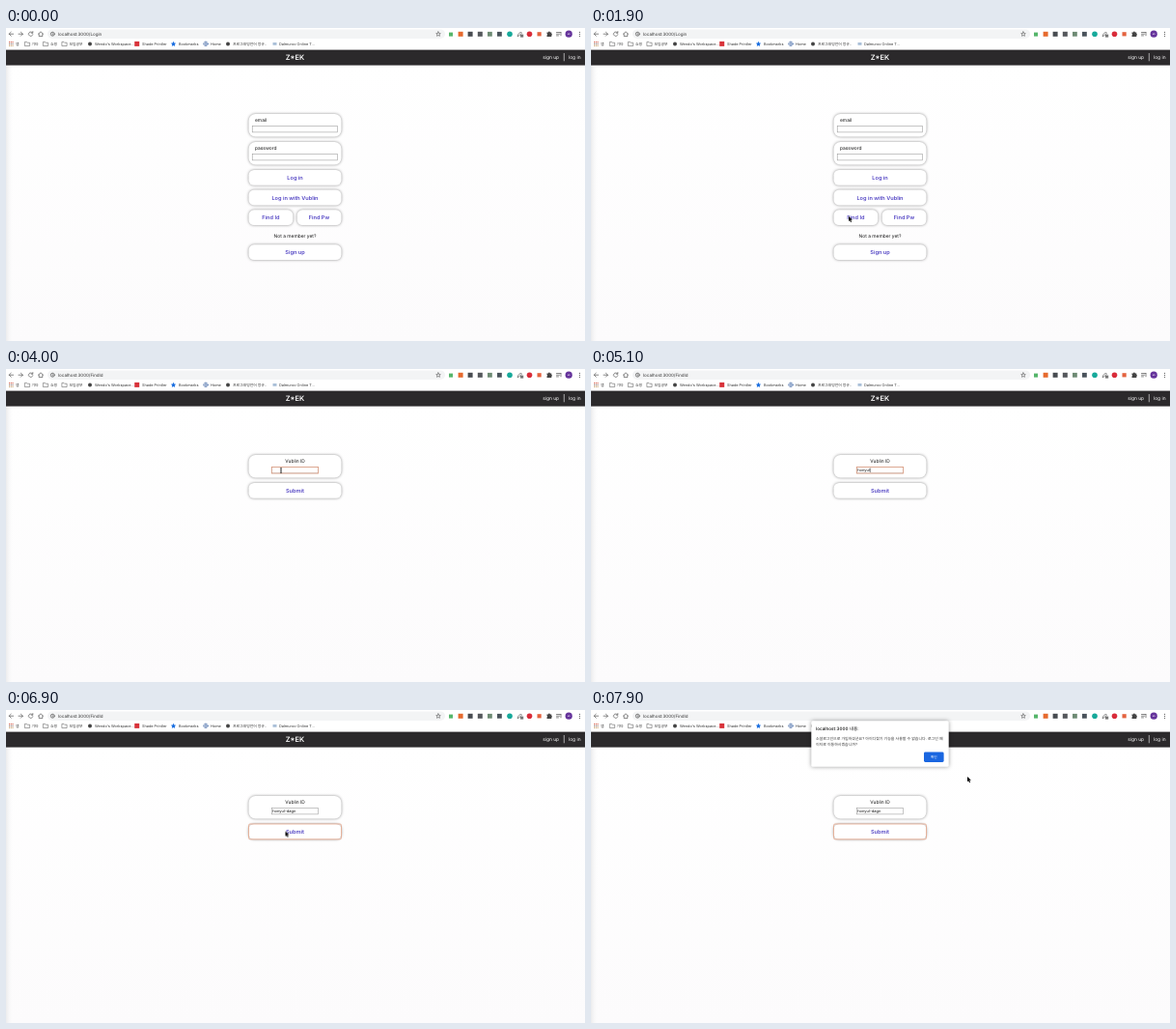
An HTML page that plays this animation: 600x324 px, repeating every 8 s.

```html
<!DOCTYPE html>
<html lang="en">
<head>
<meta charset="utf-8">
<title>Find id flow</title>
<style>
  html, body { margin: 0; width: 100%; height: 100%; overflow: hidden; background: #fff; }
  svg { position: absolute; left: 0; top: 0; width: 600px; height: 324px; }
  text {
    font: 4.9px Inter, "Noto Sans CJK KR", "Noto Sans CJK", sans-serif;
    fill: #111; text-rendering: geometricPrecision;
  }
  .mid { text-anchor: middle; }
  .url { font-size: 4.5px; fill: #333; }
  .marks text { font-size: 3.85px; fill: #333; }
  .nav text { fill: #fff; }
  .nav .brand { font-size: 7.4px; font-weight: 600; }
  .link { font-size: 5.6px; font-weight: 600; fill: #5345c4; text-anchor: middle; }
  .card { fill: #fff; filter: drop-shadow(0 0 1.6px rgba(0, 0, 0, .45)); }
  .field { fill: #fff; stroke: #8c8c8c; stroke-width: .5; }
  .ring { fill: none; stroke: #e59c7c; stroke-width: .7; }
  .line { fill: none; stroke: #555; stroke-width: .7; stroke-linecap: round; stroke-linejoin: round; }
  .typed { font-size: 4.05px; }
  .title { font-size: 4.65px; font-weight: 500; }
  .body { font-size: 3.95px; fill: #333; }
  .ok { font-size: 3.7px; font-weight: 500; fill: #fff; text-anchor: middle; }

  #login, #login-url, #find, #find-url, #focus, #pressed, #arrow, #beam, #dialog {
    animation: 8s step-end infinite;
  }
  #login, #login-url { animation-name: before; }
  #find, #find-url { animation-name: after; }
  #focus { animation-name: focus; }
  #pressed { animation-name: pressed; }
  #arrow { animation-name: arrow; }
  #beam { animation-name: beam; }
  #dialog { animation-name: dialog; transform-origin: 299.5px 35px; }
  #pointer { animation: travel 8s linear infinite; }

  @keyframes before { 0% { opacity: 1 } 30%, 100% { opacity: 0 } }
  @keyframes after { 0% { opacity: 0 } 30%, 100% { opacity: 1 } }
  @keyframes focus { 0% { opacity: 0 } 42.5% { opacity: 1 } 86.25%, 100% { opacity: 0 } }
  @keyframes pressed { 0% { opacity: 0 } 86.25%, 100% { opacity: 1 } }
  @keyframes arrow {
    0% { opacity: 0 } 2.5% { opacity: 1 } 40% { opacity: 0 } 83.75%, 100% { opacity: 1 }
  }
  @keyframes beam {
    0% { opacity: 0 } 40% { opacity: 1 } 52.5% { opacity: 0 }
    82.5% { opacity: 1 } 83.75%, 100% { opacity: 0 }
  }
  /* The screen refreshes every 100 ms, so each leg is cut into that many steps. */
  @keyframes travel {
    0% { transform: translate(569px, 153px) }
    5% { transform: translate(569px, 153px); animation-timing-function: steps(3, start) }
    8.75% { transform: translate(330px, 226px); animation-timing-function: steps(3, start) }
    12.5% { transform: translate(267px, 208px) }
    13.75% { transform: translate(267px, 208px); animation-timing-function: steps(4, start) }
    18.75% { transform: translate(267px, 194.5px) }
    35% { transform: translate(267px, 195.5px); animation-timing-function: steps(5, start) }
    41.25% { transform: translate(285px, 105px) }
    82.5% { transform: translate(285px, 105px); animation-timing-function: steps(3, start) }
    86.25% { transform: translate(289.5px, 125.5px) }
    95% { transform: translate(289.5px, 125.5px); animation-timing-function: steps(2, start) }
    97.5%, 100% { transform: translate(390px, 69px) }
  }
  @keyframes dialog {
    0% { opacity: 0 }
    87.5% { opacity: .1; transform: translateY(-7px) perspective(300px) rotateX(16deg) scale(.95) }
    88.75% { opacity: .36; transform: translateY(-4px) perspective(300px) rotateX(10deg) scale(.97) }
    90% { opacity: .8; transform: translateY(-1px) perspective(300px) rotateX(3deg) scale(.99) }
    91.25%, 100% { opacity: 1; transform: none }
  }
</style>
</head>
<body>
<svg viewBox="0 0 600 324">
  <defs>
    <linearGradient id="paper" x2="0" y2="1">
      <stop stop-color="#fff"/><stop offset="1" stop-color="#fcfbfc"/>
    </linearGradient>
    <linearGradient id="edge">
      <stop stop-color="#ececed"/><stop offset="1" stop-color="#fff" stop-opacity="0"/>
    </linearGradient>
    <path id="folder" d="M-2.6-2h2l.7.8h2.5v3.4h-5.2z" fill="none" stroke="#666" stroke-width=".6"/>
    <path id="star" d="M0-2.7.8-.9 2.7-.7 1.3.6 1.7 2.5 0 1.5-1.7 2.5-1.3.6-2.7-.7-.8-.9z"/>
  </defs>
  <rect y="38" width="600" height="286" fill="url(#paper)"/>
  <rect y="38" width="8" height="286" fill="url(#edge)"/>

  <!-- browser bars -->
  <rect width="600" height="23" fill="#fff"/>
  <rect x="43" y="1.4" width="412" height="9.6" rx="4.8" fill="#f3f4f5"/>
  <g class="line">
    <path d="M7.6 6.2h-4.4m2-2-2 2 2 2M13 6.2h4.4m-2-2 2 2-2 2"/>
    <path d="M27.4 4.8a2.2 2.2 0 1 0 .4 2M27.8 3.6v1.6h-1.6"/>
    <path d="M33.4 6.2 36 3.8l2.6 2.4M34.2 6v2.6h3.6V6"/>
    <circle cx="48.3" cy="6.2" r="2"/><path d="M48.3 6v1.2M48.3 5v.1"/>
    <use href="#star" transform="translate(448 6.2) scale(.85)"/>
  </g>
  <text id="login-url" class="url" x="54" y="7.8">localhost:3000/Login</text>
  <text id="find-url" class="url" x="54" y="7.8">localhost:3000/FindId</text>
  <rect x="459" y="4.6" width="4" height="4" fill="#55b56a"/>
  <rect x="468.6" y="3.8" width="5" height="5" fill="#e66a2e"/>
  <rect x="478.6" y="3.8" width="5" height="5" fill="#484b50"/>
  <rect x="488.8" y="3.8" width="5" height="5" fill="#55585c"/>
  <rect x="499" y="3.9" width="4.8" height="4.8" fill="#6e8b74"/>
  <rect x="509" y="3.9" width="4.8" height="4.8" fill="#4a535b"/>
  <circle cx="522" cy="6.3" r="2.8" fill="#16a99a"/>
  <path class="line" d="m530.2 8.4.4-1.6 2.8-2.8 1.1 1.1-2.8 2.8z"/>
  <rect x="533" y="6.6" width="3.2" height="3" fill="#777"/>
  <circle cx="542.5" cy="6.3" r="2.8" fill="#d92c3a"/>
  <rect x="550.5" y="4.2" width="4.2" height="4.2" fill="#e4633f"/>
  <path d="M560.5 4.5h1.5a.9.9 0 0 1 1.8 0h1.5V6a.9.9 0 0 1 0 1.7v1.2h-4.8V7.5a.8.8 0 0 0 0-1.5z" fill="#444"/>
  <path class="line" d="M570.5 4.5h4.4M570.5 6.2h3M570.5 7.9h2M575 7.8V4.6"/>
  <circle cx="583.2" cy="6.2" r="3.6" fill="#65339b"/>
  <text class="mid" x="583.2" y="7.1" style="font-size:2.5px;fill:#fff">ab</text>
  <g fill="#555"><circle cx="594.5" cy="4.3" r=".6"/><circle cx="594.5" cy="6.3" r=".6"/><circle cx="594.5" cy="8.3" r=".6"/></g>

  <g class="marks">
    <g stroke-width="1.1" stroke-dasharray="1.1 .65">
      <path d="M3 14.5h4.6" stroke="#d9604f"/><path d="M3 16.4h4.6" stroke="#a0807a"/><path d="M3 18.3h4.6" stroke="#b98a4c"/>
    </g>
    <text x="10" y="17.8">앱</text>
    <use href="#folder" x="22" y="16.4"/><text x="26.5" y="17.8">기타</text>
    <use href="#folder" x="41" y="16.4"/><text x="46" y="17.8">쇼핑</text>
    <use href="#folder" x="60.5" y="16.4"/><text x="65.5" y="17.8">모임공부</text>
    <circle cx="87" cy="16.4" r="2" fill="#444"/><text x="92" y="17.8">Wendo's Workspace...</text>
    <rect x="133.2" y="13.9" width="5" height="5" fill="#d8333a"/><text x="141" y="17.8">Shade Printler</text>
    <use href="#star" x="173.5" y="16.4" fill="#1b6fe0"/><text x="179" y="17.8">Bookmarks</text>
    <g class="line" style="stroke:#4a6fa8;stroke-width:.5"><circle cx="207" cy="16.4" r="2.3"/><path d="M204.7 16.4h4.6M207 14.1q-2 2.3 0 4.6 2-2.3 0-4.6"/></g>
    <text x="212" y="17.8">Home</text>
    <circle cx="230" cy="16.4" r="2" fill="#444"/><text x="235" y="17.8">프로그래밍언어 정규..</text>
    <rect x="276.5" y="15" width="4" height="2.8" fill="#a9bfd8"/><text x="283" y="17.8">Dalmuroo Online T...</text>
  </g>

  <g class="nav">
    <rect y="22.6" width="600" height="16" fill="#2b292b"/>
    <text class="brand mid" x="299.5" y="32.8">Z*EK</text>
    <text x="556.2" y="31.6">sign up</text>
    <path d="M578.3 26v8.3" stroke="#ddd" stroke-width=".7"/>
    <text x="583" y="31.6">log in</text>
  </g>

  <g id="login">
    <rect class="card" x="251.5" y="89" width="96" height="23.5" rx="7"/>
    <text x="258" y="96.5">email</text>
    <rect class="field" x="255.2" y="101.6" width="88.3" height="6.3"/>
    <rect class="card" x="251.5" y="118" width="96" height="23.5" rx="7"/>
    <text x="258" y="125.5">password</text>
    <rect class="field" x="255.2" y="130.6" width="88.3" height="6.3"/>
    <rect class="card" x="251.5" y="147" width="96" height="15.8" rx="5.5"/>
    <text class="link" x="299.5" y="156.8">Log in</text>
    <rect class="card" x="251.5" y="167.6" width="96" height="15.8" rx="5.5"/>
    <text class="link" x="299.5" y="177.5">Log in with Vublin</text>
    <rect class="card" x="251.5" y="188.3" width="45.8" height="15.8" rx="5.5"/>
    <text class="link" x="274.4" y="198.2">Find Id</text>
    <rect class="card" x="301.7" y="188.3" width="45.8" height="15.8" rx="5.5"/>
    <text class="link" x="324.5" y="198.2">Find Pw</text>
    <text class="mid" x="299.5" y="216.7">Not a member yet?</text>
    <rect class="card" x="251.5" y="224.3" width="96" height="15.8" rx="5.5"/>
    <text class="link" x="299.5" y="234.2">Sign up</text>
  </g>

  <g id="find">
    <rect class="card" x="251.5" y="89" width="96" height="23.5" rx="7"/>
    <text class="mid" x="299.5" y="96.5">Vublin ID</text>
    <rect class="field" x="275.3" y="101.6" width="48.3" height="6.3"/>
    <rect id="focus" class="ring" x="275.2" y="101.5" width="48.5" height="6.5"/>
    <text id="typed" class="typed" x="276.2" y="106.2"></text>
    <path id="caret" d="M0 102.6v4.4" stroke="#111" stroke-width=".5"/>
    <rect class="card" x="251.5" y="118" width="96" height="15.8" rx="5.5"/>
    <rect id="pressed" class="ring" x="251.5" y="118" width="96" height="15.8" rx="1.5"/>
    <text class="link" x="299.5" y="127.8">Submit</text>
  </g>
</svg>

<svg id="dialog" viewBox="0 0 600 324">
  <rect x="228.3" y="11.2" width="142.4" height="47.6" rx="1.6" fill="#fff" style="filter:drop-shadow(0 .8px 2px rgba(0,0,0,.4))"/>
  <text class="title" x="233" y="21">localhost:3000 내용:</text>
  <text class="body" x="233" y="30.6">소셜로그인으로 가입하셨군요? 아이디찾기 기능을 사용할 수 없습니다. 로그인 페</text>
  <text class="body" x="233" y="37">이지로 이동하시겠습니까?</text>
  <rect x="345" y="43.6" width="20.6" height="10.4" rx="1.4" fill="#1a66e0"/>
  <text class="ok" x="355.3" y="50.2">확인</text>
</svg>

<svg viewBox="0 0 600 324">
  <g id="pointer">
    <path id="arrow" d="M0 0v5.3l1.2-1.1.9 2 1-.4-.9-2h1.7z" stroke="#fff" stroke-width=".5" paint-order="stroke"/>
    <path id="beam" d="M-.9-2.6Q0-2.6 0-1.9V2Q0 2.7-.9 2.7M.9-2.6Q0-2.6 0-1.9V2Q0 2.7.9 2.7" fill="none" stroke="#222" stroke-width=".6"/>
  </g>
</svg>

<script>
  const LOOP = 8000;
  const word = "honyul-dagn";
  const keyTimes = [4200, 4300, 4500, 4700, 4900, 5100, 5400, 5700, 5800, 6000, 6200];
  const typed = document.getElementById("typed");
  const caret = document.getElementById("caret");
  const start = performance.now();

  function draw() {
    const t = (performance.now() - start) % LOOP;
    const text = word.slice(0, keyTimes.filter(k => k <= t).length);
    if (typed.textContent !== text) typed.textContent = text;

    const shown = t >= 3500 && t < 6900 && !(t >= 4000 && t < 4200);
    const x = 276.5 + (text ? typed.getComputedTextLength() : 0);
    caret.setAttribute("transform", `translate(${x} 0)`);
    caret.style.opacity = shown ? 1 : 0;
    requestAnimationFrame(draw);
  }
  draw();
</script>
</body>
</html>
```
